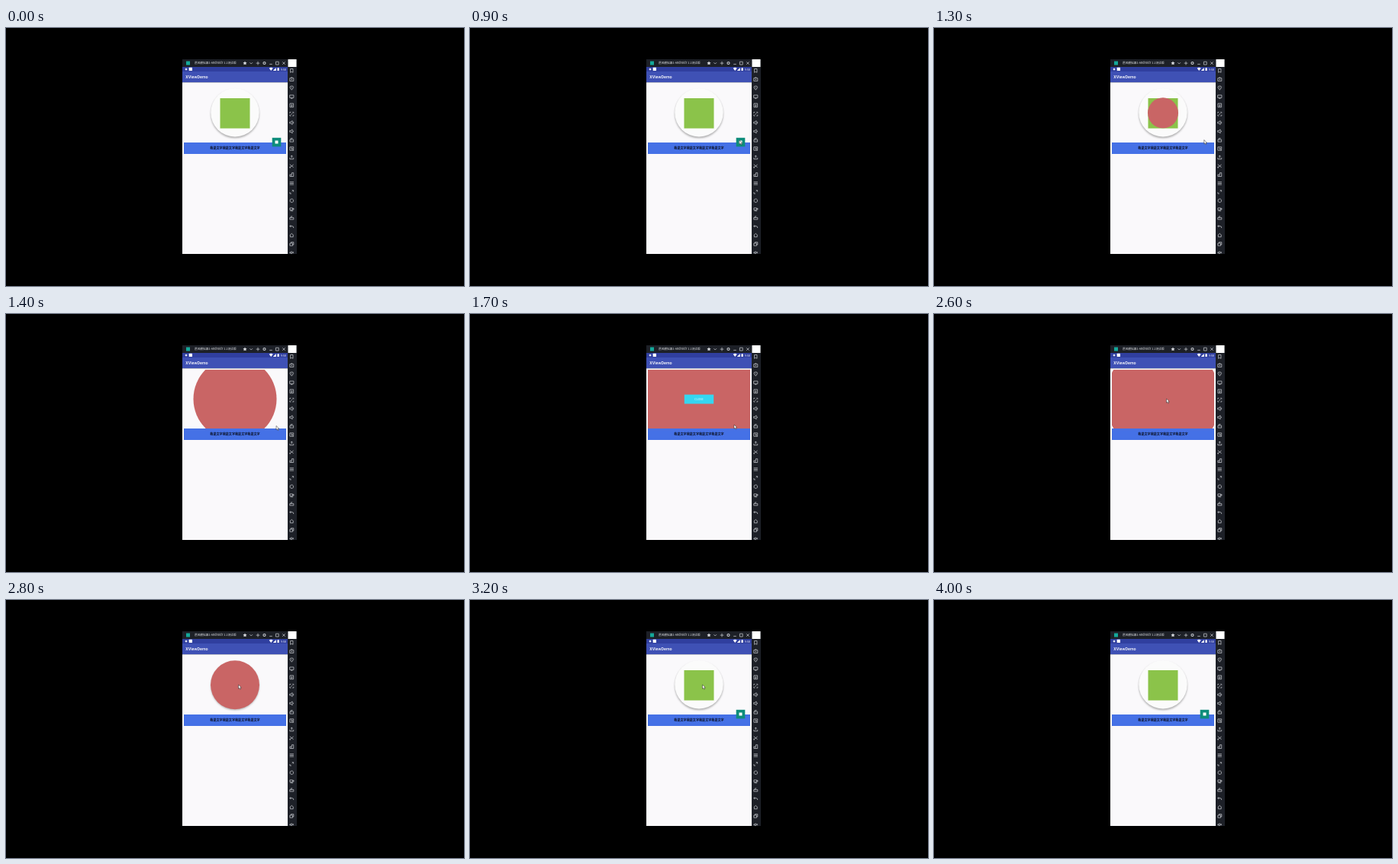
An HTML page that plays this animation: 600x338 px, repeating every 5400 ms.

```html
<!DOCTYPE html>
<html lang="zh">
<head>
<meta charset="utf-8">
<title>XViewDemo</title>
<style>
html, body { margin: 0; width: 100%; height: 100%; overflow: hidden; background: #000; }
svg { display: block; width: 100vw; height: 100vh; }
.cjk { font-family: "Noto Sans CJK SC", "Noto Sans CJK", "Noto Sans", sans-serif; }
.ui { font-family: Roboto, sans-serif; }
.line { fill: none; stroke: #c4c7cc; stroke-width: .75; }
</style>
</head>
<body>
<svg viewBox="0 0 600 338" xmlns="http://www.w3.org/2000/svg">
  <defs>
    <clipPath id="card"><rect x="233" y="73" width="134" height="77"/></clipPath>
    <clipPath id="phone"><rect x="231" y="41" width="150" height="255"/></clipPath>
    <filter id="soft" x="-20%" y="-20%" width="140%" height="140%"><feGaussianBlur stdDeviation="1"/></filter>
  </defs>
  <rect width="600" height="338"/>

  <g clip-path="url(#phone)">
    <rect x="231" y="41" width="150" height="255" fill="#1d2027"/>
    <rect x="369.5" y="41" width="11" height="10" fill="#fff"/>
    <rect x="231" y="51" width="138" height="6" fill="#303f9f"/>
    <rect x="231" y="57" width="138" height="14.3" fill="#3f51b5"/>
    <rect x="231" y="71.3" width="138" height="225" fill="#faf9fb"/>

    <!-- window title -->
    <rect x="236" y="43.5" width="5" height="5" fill="#14a89a"/>
    <text class="cjk" x="247" y="47.4" font-size="3.7" fill="#e4e6ea">晨风模拟器1-Android7.1.2测试版</text>
    <path d="M313 43.5l.8 1.6 1.7.2-1.2 1.2.3 1.8-1.6-.9-1.6.9.3-1.8-1.2-1.2 1.7-.2z" fill="#d8dade"/>
    <g class="line">
      <path d="M319.4 45.2l1.8 1.8 1.8-1.8M330 43.8v4.6M327.7 46.1h4.6M345.2 47.4h3.6M353.4 44.2h3.8v3.8h-3.8zM362.2 44.3l3.5 3.5M365.7 44.3l-3.5 3.5"/>
      <circle cx="338.5" cy="46" r="1.5" stroke-width="1.2"/>
    </g>

    <!-- status bar -->
    <circle cx="236" cy="54.1" r="1.4" fill="#dfe2f4"/>
    <rect x="239.7" y="51.8" width="4.3" height="4.3" rx=".5" fill="#fff"/>
    <path d="M344.7 52.7q2.5-1.8 5 0l-2.5 3.3zM353.8 52v4h-3.9zM355.5 52.4h.6v-.4h1v.4h.6v3.7h-2.2z" fill="#fff"/>
    <text class="ui" x="359.7" y="55.7" font-size="3.8" fill="#dfe2f4">9:58</text>
    <text class="ui" x="235.3" y="66.1" font-size="5.4" font-weight="500" fill="#fff">XViewDemo</text>

    <!-- card -->
    <circle cx="300" cy="112.5" r="31.8" fill="#777" opacity=".55" filter="url(#soft)"/>
    <circle cx="300" cy="110.8" r="31.7" fill="#fbfbfb"/>
    <rect x="280.5" y="92" width="39" height="39.5" fill="#8bc34a"/>
    <g clip-path="url(#card)"><circle id="reveal" cx="300" cy="111.3" r="0" fill="#c96565"/></g>
    <g id="button">
      <rect x="-19.2" y="-6" width="38.4" height="12" fill="#35d6f0"/>
      <text class="ui" y="1.4" font-size="3.8" text-anchor="middle" fill="#d8f8fd">CLOSE</text>
    </g>
    <rect x="233" y="150" width="134" height="15" fill="#4571e6"/>
    <text class="cjk" x="300" y="159.1" font-size="4.08" font-weight="700" text-anchor="middle" fill="#0a0f20">我是文字我是文字我是文字我是文字</text>
    <g id="fab">
      <rect x="-5.8" y="-5.7" width="11.6" height="11.6" fill="#0e8d7b"/>
      <rect x="-2" y="-2" width="4" height="4" fill="#fff"/>
    </g>
    <g id="tools" class="line"></g>
    <path id="cursor" d="M0 0v5.2l1.2-1 .9 1.9 1-.5-.9-1.8 1.6-.1z" fill="#fff" stroke="#222" stroke-width=".5"/>
  </g>
</svg>
<script>
const LOOP = 5400, STEP = 100;
const el = id => document.getElementById(id);

// Toolbar glyphs, each drawn around its own centre
const glyphs = [
  "M-1.7-2.4h3.4v4.8l-1.7-1-1.7 1z",
  "M-2.5-1.6h5v3.8h-5zM-1-2.4h2M-1 .3h2",
  "M0 2.6q-4.6-5.1 0-5.2q4.6.1 0 5.2zM-.6-.5h1.2",
  "M-2.6-2h5.2v3.4h-5.2zM-1.2 2.4h2.4",
  "M-2.3-2.4h4.6v4.8h-4.6zM0-1.5v3M-1.2.2l1.2 1.2 1.2-1.2",
  "M-2.5-1v-1.4h1.6M.9-2.4h1.6v1.4M2.5 1v1.4h-1.6M-.9 2.4h-1.6v-1.4M-1 1l2-2",
  "M-2.6-.9h1.4l2-1.6v5l-2-1.6h-1.4zM2-1.3q1 1.3 0 2.6",
  "M-2.6-.9h1.4l2-1.6v5l-2-1.6h-1.4zM2.2-.7v1.4",
  "M-2.3-.5h4.6v2.9h-4.6zM-1.2-.5v-1.6h2.6",
  "M-2.4-2.2h4.8v2M-2.4-2.2v4.4h2M.3.4h2v2h-2zM-1-.7h2",
  "M-2.4.5v1.9h4.8v-1.9M0 1v-3.3M-1.4-1l1.4-1.4 1.4 1.4",
  "M-2.5-2l4.8 3.8M-2.5 2l4.8-3.8M-2.5 1v1.3h1",
  "M-2.4-.1h2v2.5h-2zM-.4 2.4h2.8v-4.8h-2.2v2.3",
  "M-2.6-1.7h5.2M-2.6 0h5.2M-2.6 1.7h5.2",
  "M.4-2.2h1.9v1.9M-.4 2.2h-1.9v-1.9M.4-.4l.9-.9",
  "M-1.2-2.1h2.4l.9.9v2.4l-.9.9h-2.4l-.9-.9v-2.4z",
  "M-2.4-1.7h3.6v2.6h-3.6zM1.2-.5l1.4-.9v2l-1.4-.7M-1.8 2.2h3.6",
  "M-2.5-.4h5v2.4h-5zM-1-.4v-1.6h2",
  "M-1-2.1l-1.5 1.5 1.5 1.5M-2.4-.6h3.2q1.8.1 1.6 2.4",
  "M-2.5 0l2.5-2.3 2.5 2.3M-1.9-.2v2.4h3.8v-2.4",
  "M-2.4-.9h3.6v3.2h-3.6zM-1-.9v-1.4h3.5v3.3h-1.3",
  "M-2.4-.4h1l1.2-1.2v3.4l-1.2-1.2h-1zM1-1l1.3 2M2.3-1l-1.3 2"
];
el("tools").innerHTML = glyphs.map((d, i) =>
  `<path d="${d}" transform="translate(374.3 ${55.9 + i * 11.35})"/>`).join("");

// Linear interpolation through [time, ...values]
function track(keys, t) {
  if (t <= keys[0][0]) return keys[0].slice(1);
  for (let i = 1; i < keys.length; i++) {
    const a = keys[i - 1], b = keys[i];
    if (t <= b[0]) {
      const k = (t - a[0]) / (b[0] - a[0]);
      return a.slice(1).map((v, j) => v + (b[j + 1] - v) * k);
    }
  }
  return keys[keys.length - 1].slice(1);
}

const pointer = [
  [400, 232, 45], [600, 290, 98], [800, 364, 152], [900, 353, 147], [1400, 354, 146.5],
  [1600, 354, 146.5], [1700, 346, 145], [1900, 323, 126], [2200, 304.5, 111],
  [3200, 304.5, 111], [3300, 307, 114], [3500, 320, 126], [3800, 354, 152], [3900, 355, 151]
];
const radius = [
  [1200, 0], [1300, 20], [1400, 54.5], [1500, 74], [1600, 80],
  [2500, 80], [2600, 75.3], [2700, 57], [2800, 32], [2900, 11], [3000, 0]
];
const travel = [[1000, 0], [1100, .3], [1200, .8], [1300, 1], [2900, 1], [3000, .75], [3100, .25], [3200, 0]];
const grow = [[1600, 0], [1700, 1], [2400, 1], [2500, 0]];

const bend = (a, c, b, k) => a * (1 - k) ** 2 + 2 * c * k * (1 - k) + b * k * k;

function place(node, x, y, s = 1) {
  node.setAttribute("transform", `translate(${x} ${y}) scale(${s})`);
}
function show(node, on) {
  node.setAttribute("visibility", on ? "visible" : "hidden");
}

function draw(time) {
  const t = Math.floor((time % LOOP) / STEP) * STEP;
  const [r] = track(radius, t), [k] = track(travel, t), [s] = track(grow, t);
  el("reveal").setAttribute("r", r);
  place(el("fab"), bend(354.5, 342, 300, k), bend(149.5, 112, 111.3, k));
  show(el("fab"), r === 0);
  place(el("button"), 300, 111.6, s);
  show(el("button"), s > 0);
  place(el("cursor"), ...track(pointer, t));
  show(el("cursor"), t >= 400 && t < 4000);
}

const start = performance.now();
function tick() {
  draw(performance.now() - start);
  requestAnimationFrame(tick);
}
tick();
</script>
</body>
</html>
```
